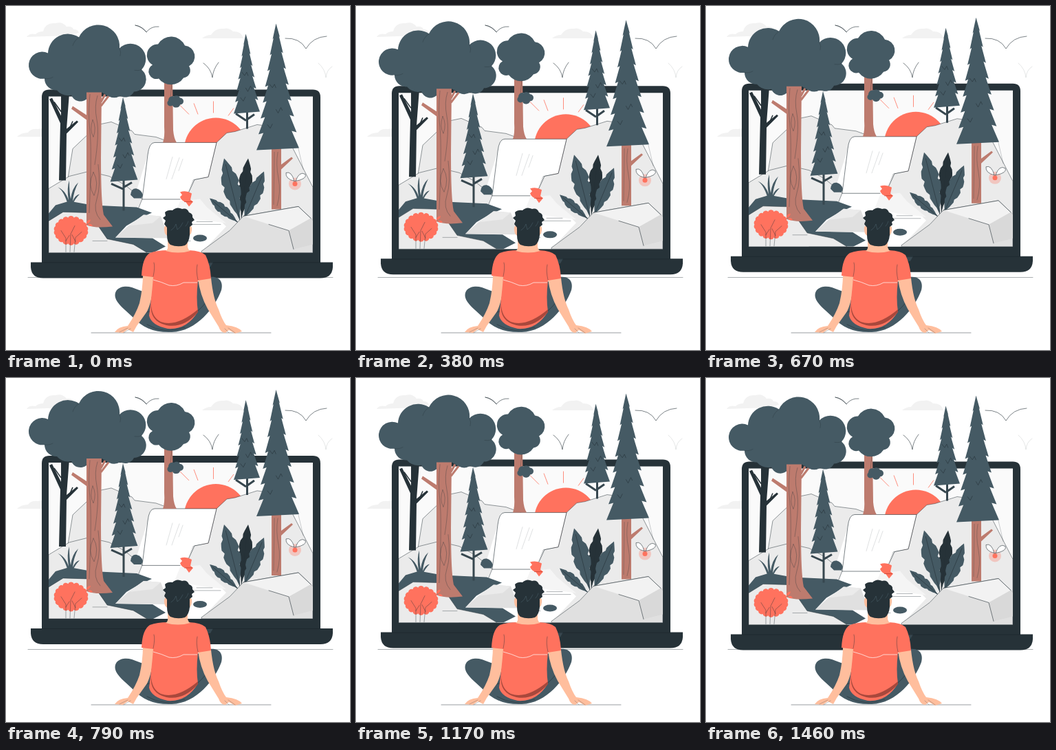
These frames come from a looping animation (500x500 px, 1.5 s). An HTML page:

```html
<!DOCTYPE html>
<html>
<head>
<meta charset="utf-8">
<style>
html, body { margin: 0; width: 100%; height: 100%; overflow: hidden; background: #fff }
svg { display: block; width: 100vw; height: 100vh }
.line { fill: none; stroke: #263238; stroke-width: .6; stroke-linecap: round; stroke-linejoin: round }
.rock { fill: #ebebeb; stroke: #263238; stroke-width: .5; stroke-linejoin: round }
.slate { fill: #455a64 }
.ink { fill: #263238 }
.bark { fill: #bd7b6e }
.red { fill: #ff725e }
.skin { fill: #ffbe9d }
</style>
</head>
<body>
<svg viewBox="0 0 500 500">
  <defs><clipPath id="screen"><path d="M62 131H446V358H62Z"/></clipPath></defs>

  <g fill="#f2f2f2">
    <path d="M30 45Q34 39 43 41Q47 37 54 37Q57 24 72 25Q82 22 88 30Q96 29 98 34Q105 34 106 39L90 43Z"/>
    <path d="M285 47Q291 42 298 42Q304 32 316 33Q324 31 330 37Q342 36 345 47Z"/>
    <path d="M16 190Q22 184 32 184Q36 178 46 179L60 177V190Z"/>
  </g>
  <path class="line" d="M188 28Q199 30 204 38Q211 29 222 30M204 38Q196 29 188 28M287 83Q298 91 300 104Q301 92 309 82M406 47Q427 46 436 62Q446 45 466 44"/>
  <path class="line" stroke-opacity=".2" d="M454 83Q464 92 465 104Q466 93 474 88"/>
  <path class="line" stroke-opacity=".65" d="M32 394.5H475"/>

  <g id="laptop">
    <path class="ink" d="M52 374V132Q52 121 63 121H446Q457 121 457 132V374Z"/>
    <path fill="#fafafa" d="M62 131H446V358H62Z"/>
    <path class="ink" d="M36 372H475V379Q474 395 457 395H54Q37 395 36 379Z"/>
    <path fill="#37474f" d="M208 372H301L297 379H212Z"/>
    <path d="M52 372.5H457" stroke="#1c262b" stroke-width=".7"/>

    <g clip-path="url(#screen)">
      <circle class="red" cx="305" cy="208" r="46"/>
      <path d="M248 139L266 157M273 141L279 157M301.500 138V155M331 148L323 159" stroke="#ff725e" stroke-width=".8"/>
      <path class="rock" d="M90 250L97 207L134 172L153 168L183 181L187 186L218 190L240 198V290H90Z"/>
      <path class="rock" d="M255 290L272 252L294 248L306 198L321 184L333 182L365 172L395 176L408 189L446 263V358H255Z"/>
      <path class="line" stroke-opacity=".4" d="M425 207L432 237"/>
      <path fill="#fff" d="M186 280L206 216Q208 198 216 198H306L294 248L272 252L260 282L300 300L320 320L284 358H180Z"/>
      <path class="line" d="M198 280L206 216Q208 198 216 198H306L294 248L274 252L262 278M190 280.500H253"/>
      <path class="line" stroke-opacity=".25" d="M242 219L233 251M252 220L241 251M257 222L251 239"/>
      <path fill="#f5f5f5" d="M253 283L282 280L292 292L320 315L280 310L245 303Z"/>
      <path class="rock" d="M62 265L92 247L120 240L150 247L172 259L198 280L190 300L62 310Z"/>
      <path class="slate" d="M181 274Q182 264 190 265Q197 267 199 274L197 279H186Z"/>
      <path class="slate" d="M62 301L72 289L92 283L125 289L190 292L212 300L192 309L175 319L159 336L213 337L232 349L222 354L214 358H150L110 330H62Z"/>
      <path fill="#e0e0e0" d="M159 336L178 319L200 303L225 305L237 337Z"/>
      <path fill="#ebebeb" d="M178 319L200 303L225 305L213 315Z"/>
      <path class="rock" d="M62 312L83 299L118 300L131 315L147 338L185 346L205 358H62Z"/>
      <path class="line" d="M126 341H147M252 317H312M277 313H300M238 341H268" stroke-opacity=".6"/>
      <ellipse class="slate" cx="282" cy="337" rx="10" ry="5"/>
    </g>

    <path class="bark" d="M230 108H242L243 180Q244 192 248 198H228Q231 190 230 175Z"/>
    <path class="line" stroke-opacity=".5" d="M241 112L239 134"/>
    <path class="slate" d="M221 55A22 22 0 0 1 260 57A16 16 0 0 1 266 87A11 11 0 0 1 258 104A22 22 0 0 1 222 105A11 11 0 0 1 213 85A16 16 0 0 1 221 55Z"/>
    <path class="slate" d="M236 137A6 6 0 0 1 244 131A6 6 0 0 1 253 133A5 5 0 1 1 253 143A6 6 0 0 1 242 144A4 4 0 0 1 236 137Z"/>

    <path class="ink" d="M80 126H92L88 178L103 166L105 168L88 185L87 253H77L79 170L63 135L67 133L80 159Z"/>
    <path d="M80 153L70 139M92 178L97 167" stroke="#263238" stroke-width="1.500"/>
    <path class="slate" d="M90 288Q83 265 73 262Q86 266 91 282Q88 264 92 253Q92 270 94 280Q96 264 105 256Q98 270 97 283Q101 274 107 273Q100 280 97 288Z"/>

    <path class="bark" d="M117 122H139L138 220Q138 285 142 303L155 320Q130 323 117 318V165L95 149L97 145L117 158Z"/>
    <path d="M138 145L151 128M138 139L144 128" stroke="#bd7b6e" stroke-width="3"/>
    <path class="line" stroke-opacity=".55" d="M122 128Q119 155 122 182T121 300M133 130Q128 145 132 165T129 230M126 165Q121 180 127 190Q132 176 126 165M127 241Q118 260 128 275Q136 256 127 241M134 230Q138 262 132 280T137 310"/>
    <path class="slate" d="M61 68A29 29 0 0 1 106 45A31 31 0 0 1 165 61A22 22 0 0 1 197 92A18 18 0 0 1 186 124A14 14 0 0 1 166 130A16 16 0 0 1 150 131L139 125H117V135A14 14 0 0 1 95 129A22 22 0 0 1 74 122A17 17 0 0 1 56 105A19.600 19.600 0 1 1 61 68Z"/>
    <path class="line" d="M106 45Q99 50 97 57M165 61Q168 67 166 72M197 92Q192 94 187 93M56 105Q63 106 68 103" stroke-opacity=".55"/>

    <path class="bark" d="M386 204H400V230L415 219L417 221L400 237V295H386Z"/>
    <path class="line" stroke-opacity=".5" d="M390 212L389 288M395 212Q392 230 396 250T394 290"/>
    <path d="M350.500 150V178M349 166L334 156M351 164L361 157M171 250V297M171 266L153 258M171 263L183 256" stroke="#37474f" stroke-width="3"/>
    <g id="pines"></g>
    <g id="leaves"></g>

    <g clip-path="url(#screen)">
      <path class="rock" style="fill:#e0e0e0" d="M284 356L325 326L345 305L425 291L443 308L446 312V358H284Z"/>
      <path fill="#f2f2f2" d="M345 305L425 291L443 308L411 326Z"/>
      <path fill="#d9d9d9" d="M443 308L411 326L418 353L446 346V311Z"/>
      <path class="line" d="M345 305L425 291L443 308M382 317L411 326L418 353"/>
    </g>

    <path id="bush" class="red"/>
    <path class="line" stroke-opacity=".7" d="M87 357V337L80 326M93 357L94 331L100 319M99 357L101 336L110 328M87 341L92 333M101 342L96 332"/>
    <path class="red" d="M117 314Q119 310 123 310Q122 315 117 316ZM119 317Q124 315 126 319Q122 321 119 317Z"/>

    <path class="red" d="M253 270Q262 267 270 272L268 281L272 284L266 291L261 284Q255 283 253 277L256 274Z"/>
    <path d="M259 284L271 284" stroke="#c9402f" stroke-width=".8"/>

    <circle class="red" cx="420" cy="258" r="9" opacity=".3"/>
    <circle class="red" cx="420" cy="258" r="3.500"/>
    <path class="line" style="fill:#fff" d="M419 254Q406 251 407 242Q415 239 419 254ZM421 254Q426 239 435 244Q438 251 421 254Z"/>
  </g>

  <path class="line" stroke-opacity=".8" d="M124 475H385"/>
  <path class="slate" d="M159 424C156 411 169 405 183 409L215 421L275 402L296 394C311 392 316 402 313 413C304 438 277 473 241 474C215 475 198 467 185 453C171 440 161 432 159 424Z"/>
  <path class="line" d="M189 452Q201 443 214 444M279 443Q292 432 296 420M205 463Q230 478 260 467"/>
  <path class="skin" d="M199 390L215 394Q214 425 205 444L190 465L185 474L177 470L170 475L158 474Q163 466 177 465Q189 447 194 432Q199 410 199 390Z"/>
  <path class="skin" d="M279 396L298 395Q301 425 309 441Q314 456 320 464Q338 466 343 473L333 476L324 471L319 475Q312 475 309 466L293 440Q282 420 279 396Z"/>
  <path class="line" stroke-opacity=".45" d="M165 474L177 468M171 475L181 469M333 475L323 468M324 475L318 469"/>
  <path class="red" d="M197 392Q198 366 209 359Q220 355 235 355H266Q284 356 290 362Q297 376 298 396L279 399Q276 425 279 444Q263 471 235 469Q211 464 208 450Q212 420 214 394Z"/>
  <path fill="#a8483c" d="M211 432Q211 452 225 459Q248 467 279 441V445Q258 469 233 464Q208 458 211 432Z"/>
  <path class="line" d="M214 393Q217 379 215 373M279 398Q276 385 278 376" stroke-opacity=".7"/>
  <path d="M214 398Q226 401 237 406Q248 408 258 402Q267 402 278 402" fill="none" stroke="#fff" stroke-width=".7"/>
  <path class="skin" d="M235 335H264V350Q265 355 268 356Q250 361 232 356Q236 354 235 348Z"/>
  <path class="skin" d="M235 319Q229 318 230 326Q231 334 236 334ZM265 319Q271 318 270 326Q269 334 264 334Z"/>
  <path class="ink" d="M234 322L230 317L232 312L228 308L232 305L231 300Q235 296 242 297Q248 291 256 295Q263 293 266 300Q272 302 271 307L274 311L270 314L271 318L267 321V333Q266 344 260 348Q249 351 239 347Q234 343 234 333Z"/>
  <path class="line" style="stroke:#546e7a" d="M240 326Q245 323 247 317L249 325Q254 322 257 315M261 320Q264 317 265 313" stroke-opacity=".7"/>
</svg>
<script>
const byId = id => document.getElementById(id);
const polygon = (points, fill) =>
  `<polygon points="${points.map(p => p.map(v => v.toFixed(1))).join(' ')}" fill="${fill}"/>`;

// Jagged silhouette widening from its tip to a slightly tilted, off-centre base.
function pine(x, top, bottom, half, tiers, lean) {
  const left = [], right = [];
  for (let i = 1; i <= tiers; i++) {
    const k = i / tiers, w = half * k ** .85, y = top + (bottom - top) * k, cx = x + lean * k;
    left.push([cx - w, y]);
    right.push([cx + w, y - 3]);
    if (i < tiers) {
      left.push([cx - w * .74, y - 2]);
      right.push([cx + w * .74, y - 5]);
    }
  }
  const y = k => top + (bottom - top) * k;
  return polygon([[x, top], ...right, ...left.reverse()], '#455a64') +
    `<path class="line" d="M${x - half * .3} ${y(.48)}l4 5l3-5l2 5M${x} ${y(.68)}l3 5l4-8l2 4M${x - half * .4} ${y(.8)}l4 5l3-6"/>`;
}

// Notched, pointed leaf growing from (x, y) along (dx, dy).
function leaf(x, y, dx, dy, width, fill) {
  const length = Math.hypot(dx, dy), nx = -dy / length, ny = dx / length, sides = [[], []];
  for (let i = 0; i <= 18; i++) {
    const k = i / 18, w = width * Math.sin(Math.PI * k ** 1.2) * (i % 4 == 2 ? .75 : 1);
    sides.forEach((side, s) => {
      const d = s ? -w : w;
      side.push([x + dx * k + nx * d, y + dy * k + ny * d]);
    });
  }
  return polygon([...sides[0], ...sides[1].reverse()], fill) +
    `<path class="line" d="M${x} ${y}l${dx * .9} ${dy * .9}"/>`;
}

byId('pines').innerHTML =
  pine(348.5, 40, 156, 19, 7, 1.5) + pine(392.5, 25, 209, 31, 8, 2.5) + pine(170, 132, 255, 20, 7, 1.5);
byId('leaves').innerHTML =
  leaf(342, 308, 10, -87, 10, '#263238') +
  leaf(340, 311, -23, -90, 13, '#455a64') +
  leaf(345, 311, 30, -71, 11, '#455a64') +
  leaf(338, 315, -42, -36, 7, '#455a64');

let outline = '';
for (let i = 0; i <= 18; i++) {
  const a = i * Math.PI / 9;
  const point = `${94.5 + 24 * Math.cos(a)} ${326 + 19 * Math.sin(a)}`;
  outline += i ? `A4.500 4.500 0 0 1 ${point}` : `M${point}`;
}
byId('bush').setAttribute('d', outline + 'Z');

function draw(now) {
  const shift = .5 - 4.4 * (1 - Math.cos((now + 35) / 1500 * 2 * Math.PI));
  byId('laptop').setAttribute('transform', `translate(0 ${shift})`);
  requestAnimationFrame(draw);
}
draw(performance.now());
</script>
</body>
</html>
```
